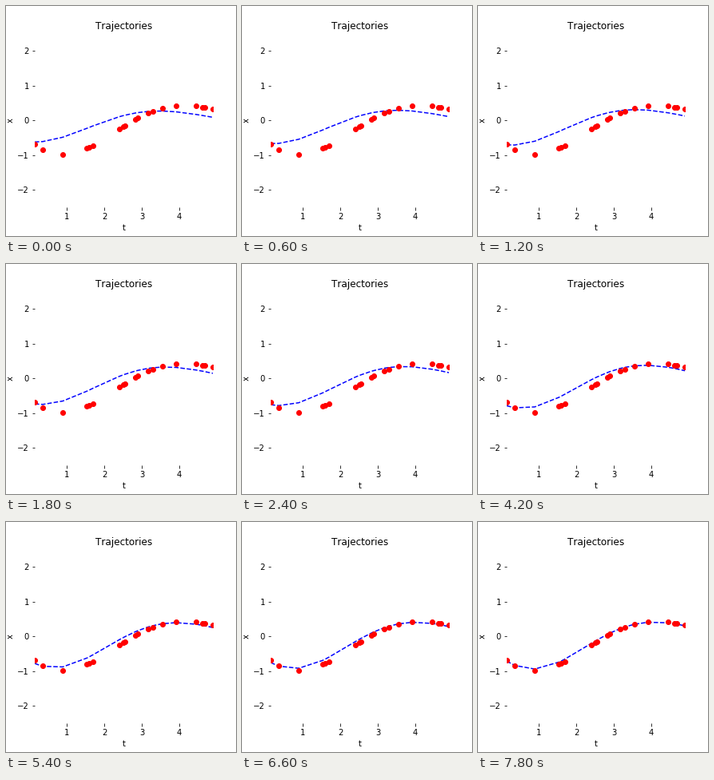
Animation, 288 px wide and 288 px high, one loop 8000 ms. Source, as a matplotlib script:

```python
import numpy as np
import matplotlib.pyplot as plt
from matplotlib.animation import FuncAnimation

INTERVAL = 200   # ms per drawn frame
FRAMES = 40
HOLD = 3         # drawn frames per training step

# Irregular observation times
TIMES = np.array([0.149, 0.363, 0.895, 1.54, 1.60, 1.70, 2.405, 2.51, 2.555, 2.83,
                  2.905, 3.17, 3.30, 3.555, 3.915, 4.45, 4.62, 4.69, 4.90])


def damped_wave(t, amp, root, freq, decay):
    """Decaying oscillation that crosses zero upwards at t = root."""
    return amp * np.exp(-decay * t) * np.sin(freq * (t - root))


def observed(t):
    return damped_wave(t, amp=1.285, root=2.785, freq=0.967, decay=0.256)


def predicted(t, step):
    """Model curve, which grows and shifts towards the data as it trains."""
    amp = 0.668 + 0.064 * step - 0.0018 * step ** 2
    root = 2.09 + 0.062 * step - 0.001 * step ** 2
    return damped_wave(t, amp, root, freq=0.95 + 0.0008 * step, decay=0.25)


plt.rcParams["text.kerning_factor"] = 6  # whole-pixel letter spacing

fig = plt.figure(figsize=(4, 4), dpi=72, facecolor="white")
fig.subplots_adjust(left=0.125, right=0.9, bottom=0.125, top=0.88)
ax = fig.add_subplot(frameon=False)
ax.set_title("Trajectories")
ax.set_xlabel("t")
ax.set_ylabel("x")
ax.set_xlim(TIMES[0], TIMES[-1])
ax.set_ylim(-2.5, 2.5)
ax.set_xticks(range(1, 5))
ax.set_yticks(range(-2, 3))

line, = ax.plot(TIMES, predicted(TIMES, 0), "b--", zorder=2)
ax.plot(TIMES, observed(TIMES), "ro", zorder=3)


def update(frame):
    line.set_ydata(predicted(TIMES, frame // HOLD))
    return line,


anim = FuncAnimation(fig, update, frames=FRAMES, interval=INTERVAL,
                     repeat=True, repeat_delay=0)
plt.show()
```
